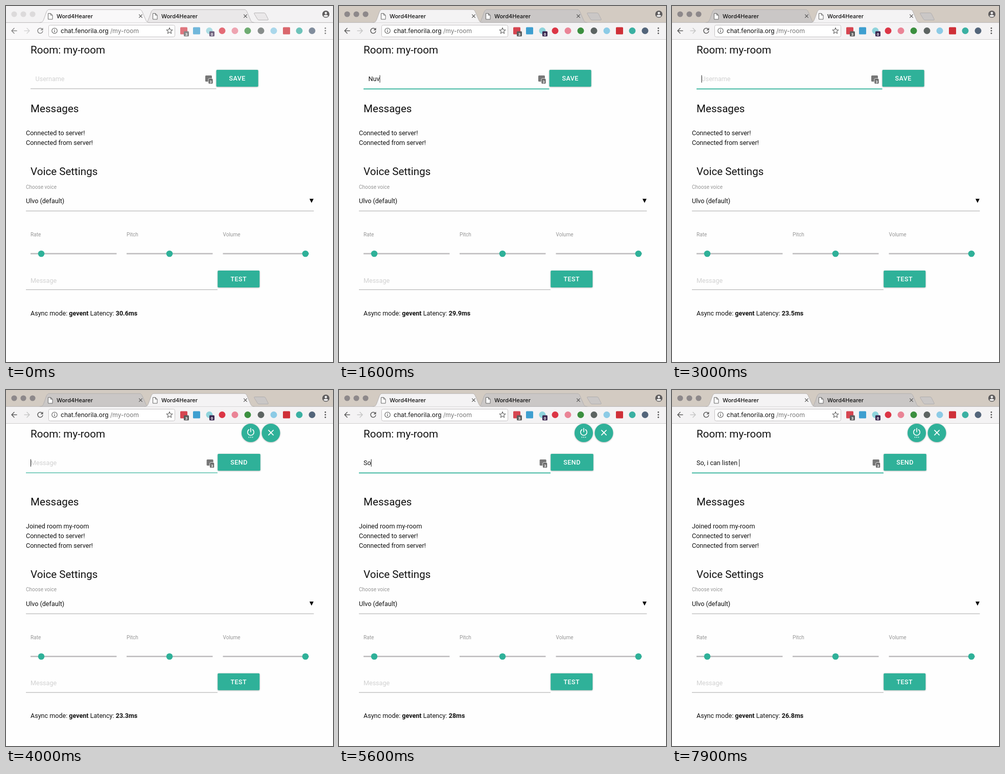
An HTML page that plays this animation: 640x697 px, repeating every 8 s.

```html
<!DOCTYPE html>
<html lang="en">
<head>
<meta charset="utf-8">
<title>Chat room</title>
<style>
  html, body { margin: 0; height: 100%; overflow: hidden; background: #fefefe; }
  svg { display: block; width: 100vw; height: 100vh; }
  text { font: 12.57px Roboto, sans-serif; fill: #111; white-space: pre; }
  .h { font-size: 20.6px; }
  .label { font-size: 10.05px; fill: #969696; }
  .hint { fill: #d1d1d1; }
  .btn { font-weight: 500; letter-spacing: .43px; fill: #fff; text-anchor: middle; }
  .bold { font-weight: 700; }
  .tab { font: 500 11px Inter, sans-serif; }
  .url { font: 12.1px Inter, sans-serif; }
  .badge { font: 700 8px Roboto, sans-serif; fill: #fff; text-anchor: middle; }
  .raised { filter: drop-shadow(0 1.5px .9px rgba(0, 0, 0, .18)) drop-shadow(0 .8px 1.8px rgba(0, 0, 0, .14)); }
  .line { fill: none; stroke-linecap: round; stroke-linejoin: round; }
</style>
</head>
<body>
<svg id="stage" viewBox="0 0 640 697" preserveAspectRatio="none"></svg>
<script>
const TEAL = '#2fb199';
const LOOP = 8000;
const SERVER_LOG = ['Connected to server!', 'Connected from server!'];

const THEMES = [
  { strip: '#f3f2f3', bar: '#f9f8f9', back: '#eae8e9', lights: '#dcdadb', tools: .72 },
  { strip: '#d3cbc2', bar: '#f4f3f4', back: '#cac7c6', lights: '#8d888a', tools: 1 },
];

const text = (x, y, str, cls = '', attrs = '') =>
  `<text x="${x}" y="${y}" class="${cls}" ${attrs}>${str}</text>`;
const rect = (x, y, w, h, fill, attrs = '') =>
  `<rect x="${x}" y="${y}" width="${w}" height="${h}" fill="${fill}" ${attrs}/>`;
const circle = (x, y, r, fill, attrs = '') =>
  `<circle cx="${x}" cy="${y}" r="${r}" fill="${fill}" ${attrs}/>`;
const stroke = (d, color, width = 1.5, attrs = '') =>
  `<path class="line" d="${d}" stroke="${color}" stroke-width="${width}" ${attrs}/>`;
const cross = (x, y, r, color, width) =>
  stroke(`M${x - r} ${y - r}l${2 * r} ${2 * r}m0 ${-2 * r}l${-2 * r} ${2 * r}`, color, width);
const button = (x, y, w, str) =>
  `<g>${rect(x, y, w, 33, TEAL, 'rx="1.7" class="raised"')}${text(x + w / 2, y + 20.8, str, 'btn')}</g>`;
const badge = (x, y, color, str) =>
  rect(x - 5, y - 5, 10, 10, color, 'rx="1.5"') + text(x, y + 3, str, 'badge');

function tab(x) {
  return `<g class="tabs" transform="translate(${x})">
    <path class="shape" stroke="#aaa8a9" stroke-width=".8"
      d="M66 32.4C72 32 72 30 74 26L79 12C81 8 82 7 85 7H261C264 7 265 8 267 12L273 26C275 30 275 32 281 32.4"/>
    <path d="M82.5 14.5h5l3.5 3.5v8h-8.5zM87.5 14.5v3.5h3.5" fill="#fff" stroke="#666"/>
    ${text(99, 23.6, 'Word4Hearer', 'tab')}
    ${cross(263.5, 19.8, 2.9, '#555', 1.2)}
  </g>`;
}

function extensions() {
  const marks = [
    [348, '#d64550', 1], [373, '#3e9fd0', 1], [398, '#8fd4dc'], [423, '#dc3545'],
    [448, '#ea8496'], [473, '#3b8f3f'], [499, '#5d6462'], [524, '#8ccbe6'],
    [549, '#cf3038', 1], [574, '#3ab0a2'], [599, '#53657a'],
  ];
  return marks.map(([x, color, square]) => square
    ? rect(x - 7, 41.5, 14, 14, color, 'rx="1.5"')
    : circle(x, 48.5, 6.5, color)).join('')
    + badge(353, 54.5, '#5c5c5c', 3) + badge(403, 54.5, '#3b2850', 0);
}

function browser() {
  const star = Array.from({ length: 10 }, (_, i) => {
    const a = i * Math.PI / 5, r = i % 2 ? 2.7 : 6.2;
    return `${320 + r * Math.sin(a)} ${48.7 - r * Math.cos(a)}`;
  }).join('L');
  return `
    <rect id="strip" width="640" height="33"/>
    <g id="lights">${[16, 34, 52].map(x => circle(x, 16, 5.6, 'currentColor')).join('')}</g>
    <path id="newTab" d="M487 13.5h18q2 0 3 2l5 10q1 2-1 2h-17q-2 0-3-2l-6-10q-1-2 1-2z" stroke="#aaa8a9" stroke-width=".8"/>
    <g>${circle(626, 16, 7, '#5d5b5c')}${circle(626, 13.8, 2.4, '#eee')}
      <path d="M621.6 20q0-2.8 4.4-2.8t4.4 2.8q-4.4 3-8.8 0z" fill="#eee"/></g>
    <rect id="bar" y="32" width="640" height="34"/>
    <g id="tabRow"><path id="tabLine" d="M0 32.4H640" stroke="#aaa8a9" stroke-width=".8"/></g>
    <g id="tools">
      ${stroke('M21 48.5H11m5-5l-5 5 5 5', '#5c5c5c')}
      ${stroke('M36 48.5h10m-5-5l5 5-5 5', '#c6c6c6')}
      ${stroke('M71.2 45.8a5 5 0 1 0 .6 4', '#5c5c5c')}
      <path d="M72.5 42.5v5h-5z" fill="#5c5c5c"/>
      ${extensions()}
      ${[43.5, 48.5, 53.5].map(y => circle(625, y, 1.4, '#555')).join('')}
    </g>
    ${rect(83.5, 37.5, 247, 23, '#fff', 'rx="3" stroke="#c4c2c3"')}
    ${circle(95, 48.5, 5.2, 'none', 'stroke="#5c5c5c" stroke-width="1.1"')}
    ${rect(94.4, 47.8, 1.3, 3.5, '#5c5c5c')}${rect(94.4, 45.5, 1.3, 1.3, '#5c5c5c')}
    ${text(107, 53, 'chat.fenorila.org', 'url')}
    ${text(204, 53, '/my-room', 'url', 'style="fill:#777"')}
    ${stroke(`M${star}Z`, '#666', 1.1)}
    ${rect(0, 65, 640, 1, '#cfcdce')}`;
}

function slider(x, thumb, name) {
  return text(x, 451, name, 'label')
    + rect(x, 483.6, 168.5, 2.6, '#bfbdbf') + circle(thumb, 485, 6.3, TEAL);
}

function settings() {
  return `<g id="settings">
    ${text(48, 331, 'Voice Settings', 'h')}
    ${text(39, 357.5, 'Choose voice', 'label')}
    ${text(39, 386.3, 'Ulvo (default)')}
    <path d="M594 377.5h8l-4 8z" fill="#000"/>
    ${rect(39, 400.8, 563.5, .9, '#9e9e9e')}
    ${slider(48, 69, 'Rate')}${slider(236, 320, 'Pitch')}${slider(424.5, 586, 'Volume')}
    ${text(48, 541.7, 'Message', 'hint')}
    ${rect(39, 554.9, 375, .9, '#9e9e9e')}
    ${button(414.3, 518, 82, 'TEST')}
    <text x="48" y="605.5">Async mode: <tspan class="bold">gevent</tspan> Latency: <tspan class="bold" id="latency"></tspan></text>
  </g>`;
}

function roomButtons() {
  return `<g id="roomButtons">
    ${circle(479, 84, 18, TEAL, 'class="raised"')}${circle(518.5, 84, 18, TEAL, 'class="raised"')}
    ${stroke('M475.5 77.5a6.2 6.2 0 1 0 7 0M479 75v7', '#fff', 1.6)}
    ${[475.5, 479, 482.5].map(x => circle(x, 92.5, .9, '#fff')).join('')}
    ${cross(518.5, 83.5, 4.6, '#fff', 1.7)}
  </g>`;
}

document.getElementById('stage').innerHTML = browser() + `
  ${text(48, 93, 'Room: my-room', 'h')}
  ${roomButtons()}
  <rect id="underline"/>
  <text id="field" y="147.3"></text>
  <rect id="caret" y="135.5" width="1" height="14.5" fill="#222"/>
  <g id="fieldIcon">${rect(390, 136, 13, 12, '#777', 'rx="1.5"')}
    ${rect(396, 142, 9, 10.5, '#666', 'rx="2" stroke="#fefefe" stroke-width=".8"')}
    ${text(400.5, 150.5, 3, 'badge')}</g>
  <g id="save">${button(411.6, 125, 82, 'SAVE')}</g>
  <g id="send">${button(414.3, 125, 83.5, 'SEND')}</g>
  <text id="messages" class="h" x="48">Messages</text>
  <g id="log"></g>` + settings();

const el = id => document.getElementById(id);
el('tabRow').insertAdjacentHTML('beforeend', tab(0) + tab(205));
const tabs = [...document.querySelectorAll('.tabs')];
const pen = document.createElement('canvas').getContext('2d');

// Each step changes only the listed properties.
const steps = [
  [0, { live: 0, tab: 0, hover: 0, joined: 0, focus: 0, value: '', latency: '30.6' }],
  [600, { live: 1 }],
  [800, { focus: 1, latency: '29.9' }],
  [1400, { value: 'N' }], [1500, { value: 'Nu' }], [1600, { value: 'Nuv' }],
  [2000, { joined: 1, value: '' }],
  [2200, { latency: '29' }],
  [2500, { hover: 1 }],
  [2800, { tab: 1, hover: 0, joined: 0, latency: '23.5' }],
  [3400, { value: 'R' }], [3500, { value: 'Ro' }], [3600, { value: 'Rop' }],
  [4000, { joined: 1, value: '', latency: '23.3' }],
  [4300, { hover: 1 }],
  [4600, { tab: 0, hover: 0, latency: '29' }],
  [5000, { latency: '28' }],
  [7000, { latency: '27.4' }],
  [7800, { latency: '26.8' }],
];
const sentence = 'So, i can listen ';
const keyTimes = [54, 56, 58, 60, 62, 63, 65, 67, 68, 70, 72, 73, 74, 76, 77, 78, 79];
keyTimes.forEach((t, i) => steps.push([t * 100, { value: sentence.slice(0, i + 1) }]));
steps.sort((a, b) => a[0] - b[0]);

function stateAt(t) {
  const state = { touched: 0, joinedAt: 0 };
  for (const [at, change] of steps) {
    if (at > t) break;
    Object.assign(state, change);
    // Typing, focusing or switching tabs restarts the caret blink.
    if (['value', 'focus', 'tab'].some(k => k in change)) state.touched = at;
    if (change.joined) state.joinedAt = at;
  }
  return state;
}

function setAttrs(id, attrs) {
  for (const name in attrs) el(id).setAttribute(name, attrs[name]);
}

function draw(t) {
  const s = stateAt(t);
  const theme = THEMES[s.live];
  el('strip').style.fill = theme.strip;
  el('bar').style.fill = theme.bar;
  el('newTab').style.fill = theme.back;
  el('lights').style.color = theme.lights;
  el('tools').style.opacity = theme.tools;
  tabs.forEach((node, i) => {
    node.querySelector('.shape').style.fill = i === s.tab || s.hover ? theme.bar : theme.back;
  });
  el('tabRow').append(tabs[1 - s.tab], el('tabLine'), tabs[s.tab]);

  const show = (id, on) => { el(id).style.display = on ? '' : 'none'; };
  show('roomButtons', s.joined);
  show('send', s.joined);
  show('save', !s.joined);
  show('caret', s.focus && (t - s.touched) % 1000 < 500);

  const fieldX = s.joined ? 48 : 57.5;
  const thick = !s.focus ? .9 : s.joined && t - s.joinedAt < 200 ? 1.2 : 1.8;
  setAttrs('underline', {
    x: s.joined ? 39 : 48, y: 161.5, width: s.joined ? 375 : 363.5,
    height: thick, fill: s.focus ? TEAL : '#9e9e9e',
  });
  setAttrs('field', { x: fieldX, class: s.value ? '' : 'hint' });
  el('field').textContent = s.value || (s.joined ? 'Message' : 'Username');
  pen.font = '12.57px Roboto, sans-serif';
  setAttrs('caret', { x: fieldX + pen.measureText(s.value).width });
  setAttrs('fieldIcon', { transform: `translate(${s.joined ? 2.7 : 0})` });

  const top = s.joined ? 18 : 0;
  setAttrs('messages', { y: 208.2 + top });
  const log = s.joined ? ['Joined room my-room', ...SERVER_LOG] : SERVER_LOG;
  el('log').innerHTML = log.map((str, i) => text(39, 253.3 + top + i * 18.9, str)).join('');
  setAttrs('settings', { transform: `translate(0 ${s.joined ? 36.8 : 0})` });
  el('latency').textContent = s.latency + 'ms';
}

const start = performance.now();
function tick() {
  draw((performance.now() - start) % LOOP);
  requestAnimationFrame(tick);
}
tick();
</script>
</body>
</html>
```
